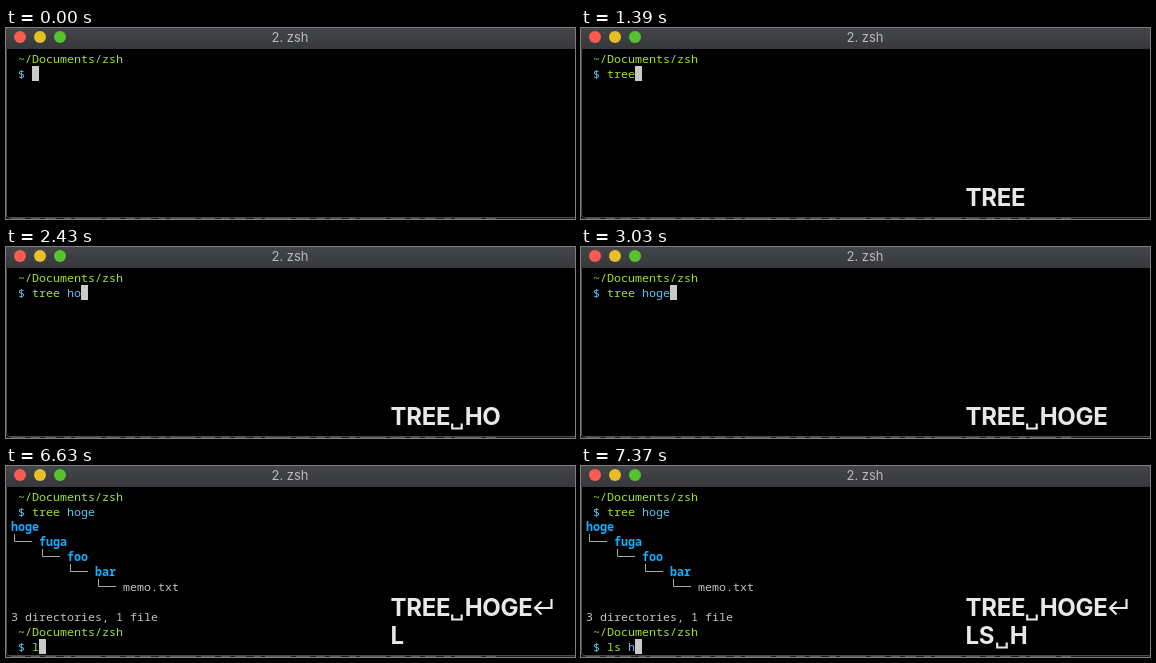
These frames come from a looping animation (569 by 191 pixels, 8000 ms). An HTML page:

```html
<!DOCTYPE html>
<html lang="en">
<head>
<meta charset="utf-8">
<title>zsh</title>
<style>
  html, body { margin: 0; width: 100%; height: 100%; overflow: hidden; background: #000; }
  svg { display: block; }
  text { white-space: pre; }
  .term { font: 11.6667px "Noto Sans Mono", monospace; fill: #c2c2c2; }
  .title { font: 13px Inter, sans-serif; fill: #b9babb; text-anchor: middle; }
  .keys { font: 700 24px Inter, sans-serif; letter-spacing: -.3px; fill: #e8e8e8; }
  .keys path { fill: none; stroke: #e8e8e8; stroke-width: 2.2; }
  .term .green { fill: #a3e425; }
  .term .cyan { fill: #62c6f0; }
  .term .red { fill: #f92660; }
  .term .dir { fill: #14b0ff; font-weight: 700; }
  .branch { fill: none; stroke: #a8a8a8; }
</style>
</head>
<body>
<svg width="569" height="191" viewBox="0 0 569 191">
  <defs>
    <linearGradient id="bar" x2="0" y2="1">
      <stop stop-color="#434548"/>
      <stop offset="1" stop-color="#37383b"/>
    </linearGradient>
  </defs>
  <rect width="569" height="191"/>
  <path d="M0 190.5H569" stroke="#1c1c1c"/>
  <path d="M5 190.5H490" stroke="#585858" stroke-dasharray="14 6 9 5 11 8 7 4 26 5"/>
  <path d="M.5 21V187q0 2.500 2.500 2.500H569" fill="none" stroke="#4a4a4a"/>
  <rect width="569" height="21" fill="url(#bar)"/>
  <circle cx="14" cy="9" r="6" fill="#fc5b53"/>
  <circle cx="34" cy="9" r="6" fill="#e6bf2b"/>
  <circle cx="54" cy="9" r="6" fill="#56c22d"/>
  <text class="title" x="284" y="14">2. zsh</text>
  <g class="term" id="term"></g>
  <g class="keys" id="keys"></g>
</svg>
<script>
  const LOOP = 8000;
  const strokes = [
    [500, 't'], [950, 'r'], [1240, 'e'], [1390, 'e'], [1840, ' '],
    [2290, 'h'], [2430, 'o'], [3030, 'ge'], [3630, '\n'],
    [6630, 'l'], [6780, 's'], [6920, ' '], [7370, 'h']
  ];
  const commands = ['tr', 'tree', 'l', 'ls'];
  const term = document.getElementById('term');
  const keys = document.getElementById('keys');

  const colX = col => 5 + col * 7;
  const rowY = row => 23 + row * 15;
  const cell = (text, col, row, cls = '') =>
    `<text class="${cls}" x="${colX(col)}" y="${rowY(row) + 12}">${text}</text>`;

  function prompt(line, row) {
    const [cmd, arg = ''] = line.split(' ');
    return cell('~/Documents/zsh', 1, row, 'green') +
      cell('$', 1, row + 1, 'cyan') +
      cell(cmd, 3, row + 1, commands.includes(cmd) ? 'green' : 'red') +
      cell(arg, 4 + cmd.length, row + 1, 'cyan');
  }

  function cursor(line, row) {
    return `<rect x="${colX(3 + line.length)}" y="${rowY(row)}" width="7" height="15" fill="#c9c9c9"/>`;
  }

  function listing() {
    const dirs = ['hoge', 'fuga', 'foo', 'bar'];
    let out = dirs.map((name, i) => cell(name, i * 4, i + 2, 'dir')).join('');
    for (let i = 0; i < 4; i++) {
      out += `<path class="branch" d="M${colX(i * 4) + 3.5} ${rowY(i + 3)}v7.500h17.500"/>`;
    }
    return out + cell('memo.txt', 16, 6) + cell('3 directories, 1 file', 0, 8);
  }

  function caption(line, spaceX, y, entered) {
    const [cmd, arg] = line.toUpperCase().split(' ');
    let out = `<text x="384.5" y="${y}">${cmd}</text>`;
    if (arg !== undefined) {
      out += `<path d="M${spaceX} ${y - 1.5}v5h9.500v-5"/>` +
        `<text x="${spaceX + 12.5}" y="${y}">${arg}</text>`;
    }
    if (entered) {
      out += `<path d="M545.500 ${y - 17}v9H529M535.500 ${y - 14.5}l-6.500 6.500 6.500 6.500"/>`;
    }
    return out;
  }

  let shown = null;

  function draw() {
    const now = performance.now() % LOOP;
    const typed = strokes.filter(([at]) => now >= at).map(([, text]) => text).join('');
    if (typed !== shown) {
      shown = typed;
      const [first, second] = typed.split('\n');
      const entered = second !== undefined;
      term.innerHTML = prompt(first, 0) +
        (entered ? listing() + prompt(second, 9) + cursor(second, 10) : cursor(first, 1));
      keys.innerHTML = caption(first, 446.2, second ? 150 : 178, entered) +
        (second ? caption(second, 416.2, 178, false) : '');
    }
    requestAnimationFrame(draw);
  }
  draw();
</script>
</body>
</html>
```
